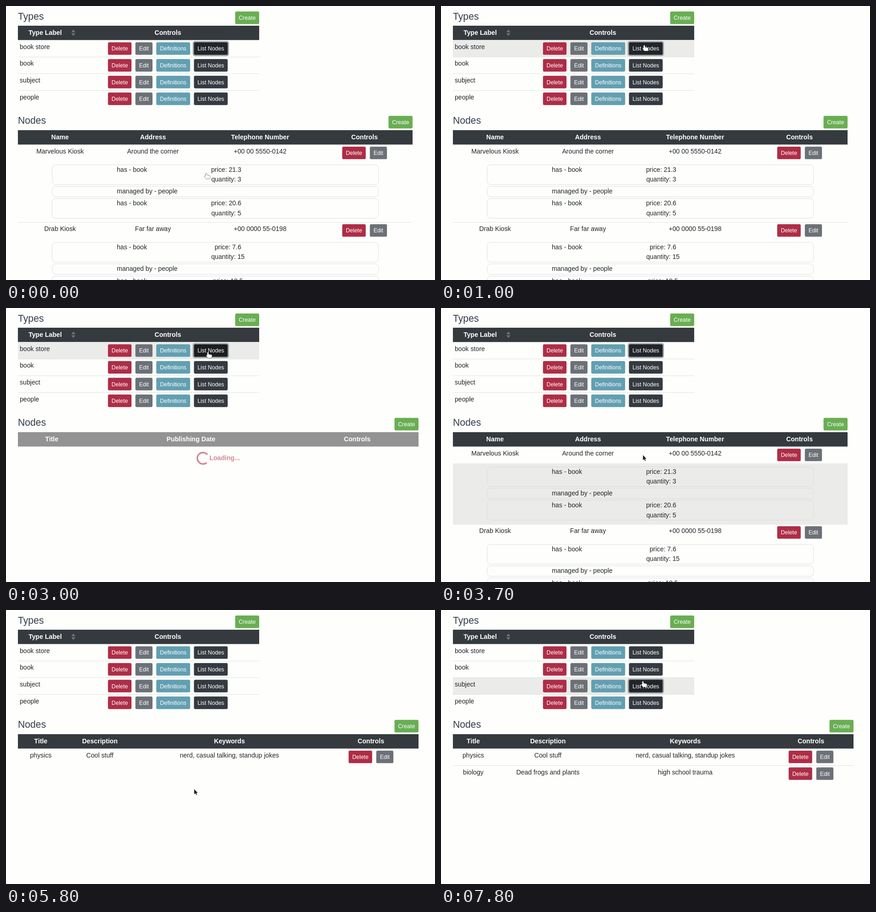
These frames come from a looping animation (937x598 px, 8 s). An HTML page:

```html
<!DOCTYPE html>
<html lang="en">
<head>
<meta charset="utf-8">
<title>Types and nodes</title>
<style>
  html, body { margin: 0; width: 100%; height: 100%; overflow: hidden; background: #fefffc; }
  svg { display: block; width: 937px; height: 598px; font: 14.13px "Liberation Sans", Arial, sans-serif; fill: #212529; }
  .head { font-weight: bold; fill: #fff; }
  .btn { font-size: 12.36px; fill: #fff; }
  .title { font-size: 21.2px; fill: #343c4a; }
  .mid { text-anchor: middle; }
  .load { font-weight: bold; fill: #d4879a; }
</style>
</head>
<body>
<svg id="stage" viewBox="0 0 937 598"></svg>
<script>
const stage = document.getElementById('stage');
const LOOP = 8000, LEFT = 26, ROW = 36.55, HEAD = '#353a3f', HOVER = '#ebebe9';
const RED = '#ae2d46', GRAY = '#6c7177', BLUE = '#629fb1', GREEN = '#69ae53', DARK = '#343a40';

// Node lists: right edge, columns [label, center, center while loading], rows [cells, relations]
const storeCols = [['Name', 118, 91], ['Address', 321, 248], ['Telephone Number', 555, 527], ['Controls', 783, 808]];
const bookCols = [['Title', 150, 100], ['Publishing Date', 433, 404], ['Controls', 740, 767]];
const subjectCols = (a, b, c, d) => [['Title', a, 89], ['Description', b, 294], ['Keywords', c, 560], ['Controls', d, 793]];
const has = (price, count) => ['has - book', 'price: ' + price, 'quantity: ' + count];
const managed = ['managed by - people'];
const bookRels = [['written by - people'], ['talks about - subject']];
const physics = [['physics', 'Cool stuff', 'nerd, casual talking, standup jokes'], []];
const plainBook = [['Plain pages', '2019-03-14'], bookRels];
const views = {
  stores: { right: 888, cols: storeCols, rows: [
    [['Marvelous Kiosk', 'Around the corner', '+00 00 5550-0142'], [has(21.3, 3), managed, has(20.6, 5)]],
    [['Drab Kiosk', 'Far far away', '+00 0000 55-0198'], [has(7.6, 15), managed, has(18.5, 10)]]] },
  books: { right: 888, cols: bookCols, rows: [
    plainBook,
    [['Slow ink', '2017-10-02'], bookRels],
    [['Tall lamps', '2018-06-21'], bookRels]] },
  book: { right: 901, cols: bookCols, rows: [plainBook] },
  subject: { right: 901, cols: subjectCols(76, 205, 488, 797), rows: [physics] },
  subjects: { right: 901, cols: subjectCols(70.5, 233.5, 533.5, 808), rows: [
    physics, [['biology', 'Dead frogs and plants', 'high school trauma'], []]] }
};

// [time, view, loading]
const shows = [[0, 'stores'], [1900, 'books'], [2900, 'books', 1], [3100, 'stores'], [4400, 'stores', 1],
  [4600, 'book'], [5600, 'book', 1], [5800, 'subject'], [7600, 'subject', 1], [7800, 'subjects']];
// [time, focused type row]
const focuses = [[0, 0], [1800, 1], [2800, 0], [4400, -1], [7500, 2]];
// [time, x, y, hand, hovered item]: t = type row, n = node row, d = details of a node
const moves = [
  [0, 437, 365, 1, ''], [100, 437, 365, 1, 'd0.0'], [600, 437, 345, 1, 'n0'], [700, 440, 262, 0, ''],
  [800, 442, 176, 1, 't2'], [900, 444, 116, 1, 't1'], [1000, 444, 86, 1, 't0'],
  [1500, 444, 93, 1, 't0'], [1600, 443, 112, 1, 't1'], [1700, 442, 123, 1, 't1'],
  [2000, 442, 125, 1, 't1'], [2100, 442, 127, 1, 't1'], [2200, 442, 125, 1, 't1'], [2300, 441, 122, 1, 't1'],
  [2400, 441, 106, 1, 't0'], [2500, 441, 97, 1, 't0'],
  [3300, 441, 152, 1, 't2'], [3400, 441, 235, 0, ''], [3500, 441, 291, 0, 'n0'],
  [3700, 441, 321, 0, 'd0'], [3800, 430, 342, 0, 'd0.0'], [3900, 419, 356, 0, 'd0.0'],
  [4100, 419, 356, 1, 'd0.0'], [4400, 419, 356, 0, ''], [4600, 419, 356, 1, 'd0.0'],
  [5000, 417, 366, 1, 'd0.0'], [5100, 413, 380, 1, 'd0.1'], [5200, 411, 390, 1, 'd0.1'],
  [5600, 411, 391, 0, ''], [6100, 412, 378, 0, ''], [6200, 416, 360, 0, ''], [6300, 421, 343, 0, ''],
  [6400, 425, 333, 0, 'n0'], [6500, 428, 325, 0, 'n0'],
  [7000, 436, 250, 0, ''], [7100, 441, 187, 1, 't3'], [7300, 441, 156, 1, 't2']];

const at = (list, t) => list.filter(k => k[0] <= t).pop();
const text = (s, x, y, cls = '') => `<text x="${x}" y="${y}" class="${cls}">${s}</text>`;
const rect = (x, y, w, h, fill, more = '') => `<rect x="${x}" y="${y}" width="${w}" height="${h}" fill="${fill}" ${more}/>`;
const line = (y, right) => rect(LEFT, y, right - LEFT, 0.9, '#dcdfdf');
const button = (s, x, y, w, fill) => rect(x, y, w, 27.4, fill, 'rx="2.9"') + text(s, x + w / 2, y + 18.2, 'btn mid');

function types(focus, hover, pressed) {
  let out = text('Types', LEFT, 29.5, 'title') + button('Create', 500.5, 12, 52.5, GREEN) +
    rect(LEFT, 43, 527, 31.3, HEAD) + text('Type Label', 85.5, 63, 'head mid') + text('Controls', 353.5, 63, 'head mid') +
    '<path d="M142.6 57.2h9l-4.5-6zM142.6 59.6h9l-4.5 6z" fill="#6f7276"/>';
  ['book store', 'book', 'subject', 'people'].forEach((name, i) => {
    const y = 74.3 + i * ROW, b = y + 4.9, over = hover === 't' + i, on = focus === i;
    if (over) out += rect(LEFT, y, 527, ROW, HOVER);
    if (i) out += line(y, 553);
    out += text(name, 30, y + 19.6) + button('Delete', 222.7, b, 51.4, RED) +
      button('Edit', 282.6, b, 37.4, GRAY) + button('Definitions', 328.2, b, 74, BLUE);
    if (on) out += rect(407.7, b - 2.8, 79.3, 33, '#a4a6a8', 'rx="5"');
    out += button('List Nodes', 410.5, b, 73.7, on && pressed ? '#1b1e21' : on || over ? '#212529' : DARK);
  });
  return out;
}

function details(rels, y, right, over, inner) {
  let out = '', top = y + 44.2;
  rels.forEach(([label, ...lines], i) => {
    const h = lines.length ? 43 : 22.7;
    out += rect(101, top, right - 175.4, h, over && inner === i ? 'rgba(0,0,0,.075)' : 'none',
      'rx="7" stroke="#d9dcde" stroke-width=".9"');
    out += text(label, right > 890 ? 244.5 : 242, top + 15.2);
    const mid = lines[1] && lines[1].length > 11 ? 484.7 : 481;
    lines.forEach((s, k) => out += text(s, mid, top + 15.2 + k * 21.2, 'mid'));
    top += h + 3.9;
  });
  const end = top + 4.7;
  const back = over ? rect(LEFT, y + ROW, right - LEFT, end - y - ROW, HOVER) : '';
  return [back + out, end];
}

function spinner(age) {
  const turn = 5 + (age - 100) * 0.48;
  return `<path d="M8.8 8.8A12.4 12.4 0 1 1 8.8 -8.8" transform="translate(430.2 328) rotate(${turn})"
    fill="none" stroke="#d4879a" stroke-width="3.5"/>` + text('Loading...', 444.3, 331.8, 'load');
}

function nodes({ right, cols, rows }, loading, age, hover) {
  if (loading) right = 901;
  let out = text('Nodes', LEFT, 257.3, 'title') + button('Create', right - 52.5, 239.8, 52.5, GREEN) +
    rect(LEFT, 271, right - LEFT, 31.4, loading ? '#929392' : HEAD);
  cols.forEach(c => out += text(c[0], c[loading ? 2 : 1], 291, 'head mid'));
  if (loading) return out + spinner(age);
  let y = 302.4;
  const [key, inner] = hover.split('.');
  rows.forEach(([cells, rels], i) => {
    if (hover === 'n' + i) out += rect(LEFT, y, right - LEFT, ROW, HOVER);
    if (i) out += line(y, right);
    cells.forEach((s, k) => out += text(s, cols[k][1], y + 19.6, 'mid'));
    const mid = cols[cols.length - 1][1];
    out += button('Delete', mid - 48.7, y + 4.5, 51.4, RED) + button('Edit', mid + 11.7, y + 4.5, 37.4, GRAY);
    if (rels.length) {
      const [part, end] = details(rels, y, right, key === 'd' + i, inner && +inner);
      out += part;
      y = end;
    } else y += ROW;
  });
  return out;
}

function cursor(x, y, hand) {
  const shape = hand
    ? 'd="M-1.3 .6Q0-1.6 1.3.6V4L7.3 5Q9 5.4 8.8 7.5L7.8 12H0L-3.6 6.8Q-3.4 4.8-1.3 6.6Z" fill="#fff" stroke="#25282b"'
    : 'd="M0 0V11.2L2.6 8.8 4.5 12.8 6.2 12 4.4 8.2H7.9Z" fill="#202124" stroke="#fff"';
  return `<path transform="translate(${x} ${y})" ${shape} stroke-width="1" stroke-linejoin="round" paint-order="stroke"/>`;
}

let last = -1;
function draw(now) {
  const t = Math.floor(now % LOOP / 100) * 100;
  if (t !== last) {
    last = t;
    const [start, name, loading] = at(shows, t);
    const [, x, y, hand, hover] = at(moves, t);
    const pressed = t >= 2800 && t < 3100;
    stage.innerHTML = types(at(focuses, t)[1], hover, pressed) +
      nodes(views[name], loading, t - start, hover) + cursor(x, y, hand);
  }
  requestAnimationFrame(draw);
}
draw(performance.now());
</script>
</body>
</html>
```
